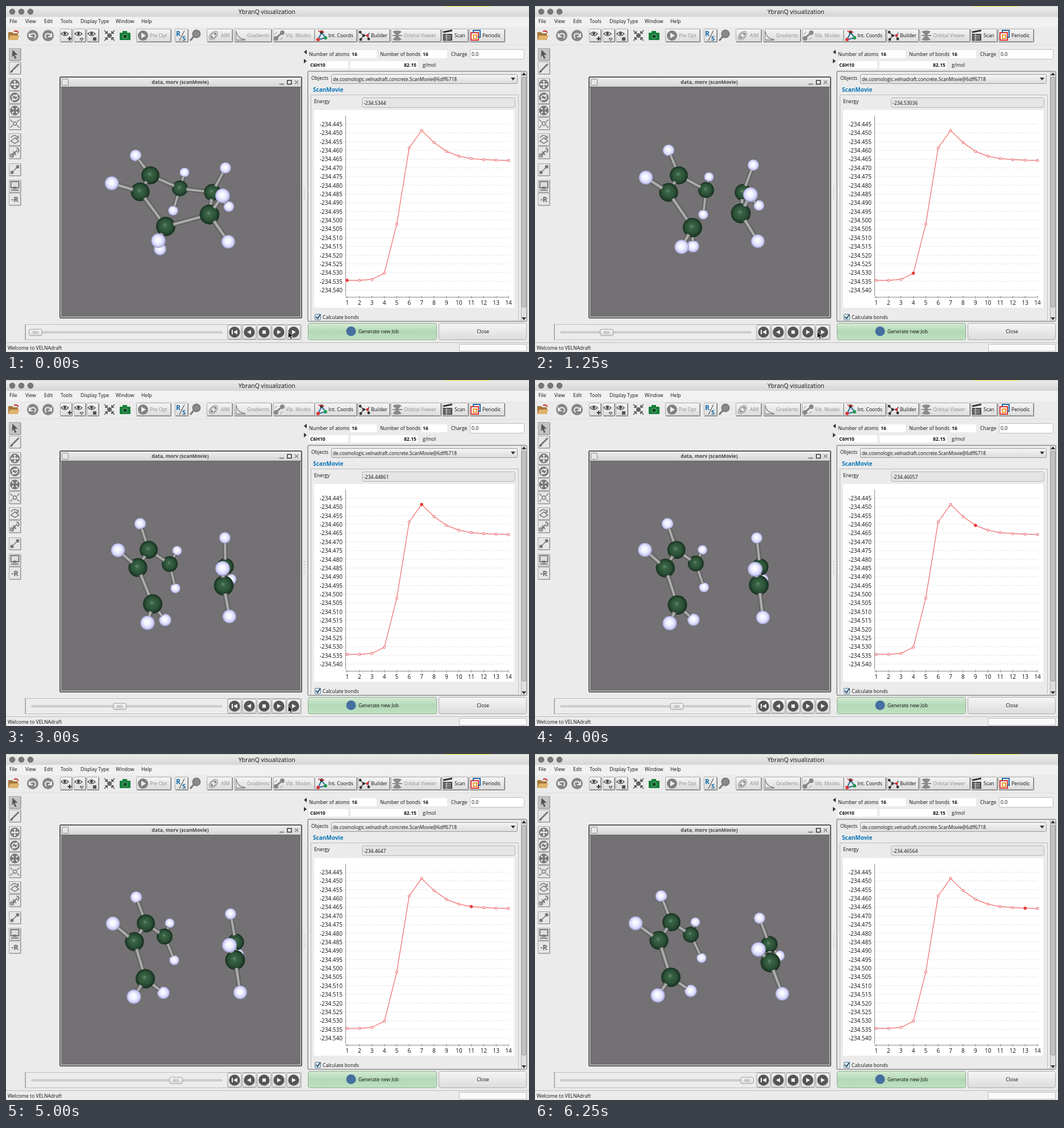
An HTML page for the animation above (6500 ms loop, 920 by 609 pixels).

```html
<!DOCTYPE html>
<html>
<head>
<meta charset="utf-8">
<title>Scan viewer</title>
<style>
html, body { margin: 0; width: 100%; height: 100%; overflow: hidden; background: #ebebeb; }
svg { display: block; }
text { font: 8.6px "Open Sans", "Noto Sans", sans-serif; fill: #111; white-space: pre; }
.b { font-weight: 700; }
.off { fill: #8d8d8d; }
.axis { font-size: 10px; font-weight: 500; }
</style>
</head>
<body>
<svg id="stage" width="920" height="609" viewBox="0 0 920 609"></svg>
<script>
const rect = (x, y, w, h, fill, stroke = 'none', rx = 0, sw = 1) =>
  `<rect x="${x}" y="${y}" width="${w}" height="${h}" fill="${fill}" stroke="${stroke}" rx="${rx}" stroke-width="${sw}"/>`;
const disc = (x, y, r, fill, stroke = 'none', sw = 1) =>
  `<circle cx="${x}" cy="${y}" r="${r}" fill="${fill}" stroke="${stroke}" stroke-width="${sw}"/>`;
const path = (d, stroke, sw = 1, fill = 'none', more = '') =>
  `<path d="${d}" stroke="${stroke}" stroke-width="${sw}" fill="${fill}" ${more}/>`;
const shape = (d, fill) => path(d, 'none', 0, fill);
const text = (x, y, s, more = '') => `<text x="${x}" y="${y}" ${more}>${s}</text>`;
const at = (x, y, s) => `<g transform="translate(${x} ${y})">${s}</g>`;
const mid = 'text-anchor="middle"', end = 'text-anchor="end"';
const ramp = (id, ...cols) => `<linearGradient id="${id}" x2="0" y2="1">` +
  cols.map((c, i) => `<stop offset="${i / (cols.length - 1)}" stop-color="${c}"/>`).join('') + '</linearGradient>';
const ball = (id, ...stops) => `<radialGradient id="${id}" cx=".5" cy=".5" r=".52" fx=".45" fy=".42">` +
  stops.map(([o, c]) => `<stop offset="${o}" stop-color="${c}"/>`).join('') + '</radialGradient>';

// ---- scan data ----
const energies = [-234.5344, -234.53441, -234.53388, -234.53036, -234.50223, -234.45856, -234.44861,
  -234.45552, -234.46057, -234.46332, -234.4647, -234.46532, -234.46564, -234.4658];
const plotX = i => 600 + i * 21.85;
const plotY = e => 208 + (-234.445 - e) * 3073.7;

// ---- molecule: atoms from back to front, x and y sampled along the scan ----
const xKeys = [1, 4, 7, 11, 14], yKeys = [1, 4, 9, 14];
const atoms = [
  [[314, 306, 301, 288, 282], [293, 301, 299, 296]],
  [[294, 296, 298, 296, 293], [360, 367, 365, 359]],
  [[306, 301, 288, 279, 274], [321, 324, 323, 318]],
  [[392, 394, 396, 409, 430], [353, 351, 351, 355]],
  [[363, 366, 386, 404, 412], [328, 328, 329, 335]],
  [[386, 384, 385, 395, 395], [285, 280, 278, 289]],
  [[228, 235, 236, 229, 222], [263, 254, 253, 250]],
  [[254, 253, 251, 246, 240], [298, 298, 299, 296]],
  [[271, 278, 280, 277, 274], [428, 423, 422, 417]],
  [[236, 235, 232, 226, 218], [327, 328, 331, 328]],
  [[281, 277, 258, 245, 239], [388, 390, 396, 393]],
  [[358, 362, 383, 403, 414], [367, 365, 361, 367]],
  [[391, 392, 393, 412, 435], [415, 414, 418, 422]],
  [[186, 195, 197, 188, 177], [312, 302, 299, 298]],
  [[268, 258, 249, 225, 216], [413, 424, 428, 425]],
  [[381, 379, 381, 393, 393], [334, 332, 333, 344]]
];
const carbons = [2, 4, 7, 9, 10, 11];
const bonds = [[0, 2], [1, 2], [3, 4], [4, 5], [6, 7], [2, 7], [7, 9], [9, 10], [8, 10], [4, 11],
  [11, 12], [9, 13], [10, 14], [11, 15]];
const weakBonds = [[2, 4], [10, 11]];

// Cubic Hermite through the keys
function curve(keys, v, p) {
  const last = keys.length - 1;
  let i = 0;
  while (i < last - 1 && p > keys[i + 1]) i++;
  const slope = j => {
    const a = Math.max(0, j - 1), b = Math.min(last, j + 1);
    return (v[b] - v[a]) / (keys[b] - keys[a]);
  };
  const h = keys[i + 1] - keys[i], u = (p - keys[i]) / h, w = 1 - u;
  return v[i] * (1 + 2 * u) * w * w + v[i + 1] * u * u * (3 - 2 * u) + h * u * w * (slope(i) * w - slope(i + 1) * u);
}

function bondShape(a, b, width) {
  const dx = b.x - a.x, dy = b.y - a.y, f = Math.min(.8, a.r * .82 / Math.hypot(dx, dy));
  const d = `M${a.x + dx * f} ${a.y + dy * f}L${b.x} ${b.y}`;
  return path(d, '#555', width) + path(d, '#858585', width * .72) + path(d, '#b2b2b2', width * .34);
}

function molecule(p) {
  const links = p < 4 ? bonds.concat(weakBonds) : bonds;
  const pts = atoms.map(([xs, ys], i) => {
    const c = carbons.includes(i);
    return { c, x: curve(xKeys, xs, p), y: curve(yKeys, ys, p), r: c ? 13.2 + .38 * i : 8.5 + .3 * i };
  });
  return pts.map((a, i) => links.filter(l => l[1] === i)
    .map(l => bondShape(pts[l[0]], a, 6.8 + i * .13)).join('') +
    disc(a.x, a.y, a.r, a.c ? 'url(#carbon)' : 'url(#hydrogen)')).join('');
}

// ---- window chrome and toolbar ----
const button = (x, w) => rect(x + .5, 40.5, w, 22, 'url(#btn)', '#aaa', 1) +
  path(`M${x + 1} 63.5H${x + w + 1.5}V41`, '#777');
const eye = x => path(`M${x} 49q6 -7 13 0q-6 6 -13 0z`, '#444', 1.2, '#eee') + disc(x + 6.5, 48.5, 2.4, '#444');
const undo = path('M-5 1Q-3 -5 3 -3Q7 0 3 5M-6 -4V2H0', '#eee', 2);

function toolbar() {
  let s = rect(0, 0, 920, 19, 'url(#bar)') + rect(0, 0, 920, 1, '#c3d2bf') + rect(771, 0, 81, 1, '#e5e02c') +
    [11, 27, 43].map(x => disc(x, 10, 4.8, '#777', '#666')).join('') +
    text(459, 14, 'YbranQ visualization', mid + ' style="font-size:10.5px"') +
    rect(0, 19, 920, 18, '#f1f1f1') + path('M0 68.5H920', '#dedede');
  [[6, 'File'], [34, 'View'], [67, 'Edit'], [96, 'Tools'], [131, 'Display Type'], [193, 'Window'], [238, 'Help']]
    .forEach(([x, t]) => s += text(x, 30, t));
  s += shape('M4 46h7l2 2h8v12H4z', '#a8773c') + shape('M7 52h17l-4 8H4z', '#dfb26b') + path('M14 45q5 -3 8 2', '#c33', 2);
  s += at(47, 52, disc(0, 0, 10, '#858585') + undo) + at(74, 52, disc(0, 0, 10, '#858585') + `<g transform="scale(-1 1)">${undo}</g>`);
  [95, 119, 142].forEach(x => s += button(x, 20) + eye(x + 2));
  s += path('M112 54v7M108.500 57.500h7', '#333', 2) + path('M130 57h6l-3 4z', '#333', 1) + rect(153, 55, 6, 6, '#555');
  s += disc(182, 52, 4, '#666') + path('M173 43l5 5M191 43l-5 5M173 61l5 -5M191 61l-5 -5M178 44v4h-4M186 44v4h4M178 60v-4h-4M186 60v-4h4', '#444', 1.4);
  s += rect(200, 47, 19, 13, '#15803a', 'none', 1) + rect(205, 44, 8, 4, '#15803a') + disc(209.5, 53.5, 4, '#0b4d22', '#8cc79d');
  s += button(229, 60) + disc(241, 52, 9, '#808080') + shape('M238 47l8 5l-8 5z', '#eee') + text(253, 55, 'Pre Opt', 'class="off"');
  s += button(297, 22) + text(299, 53, 'R', 'class="b" style="font-size:12px;fill:#1769a5"') +
    text(310, 61, 'S', 'class="b" style="font-size:11px;fill:#1769a5"') + path('M305 61L314 43', '#333');
  s += disc(335, 49, 6.5, '#8a8a8a', '#777', 2) + path('M330 54l-6 7', '#777', 3);
  [[353, 44, 378, 'AIM', 1], [401, 65, 424, 'Gradients', 1], [470, 72, 492, 'Vib. Modes', 1], [543, 73, 567, 'Int. Coords'],
    [619, 55, 642, 'Builder'], [677, 87, 700, 'Orbital Viewer', 1], [767, 45, 789, 'Scan'], [815, 61, 838, 'Periodic']]
    .forEach(([x, w, tx, t, off]) => s += button(x, w) + text(tx, 55, t, off ? 'class="off"' : ''));
  s += `<g transform="rotate(-45 365 52)">${[9, 6].map(r => `<ellipse cx="365" cy="52" rx="${r}" ry="${r * .6}" fill="none" stroke="#888"/>`).join('')}</g>` +
    disc(362, 55, 2, '#888') + disc(368, 49, 2, '#888');
  s += path('M404.5 43V60H421M405 45Q408 58 421 59', '#888', 1.3);
  s += path('M473 58L487 46', '#888', 3) + disc(475, 57, 4, '#888') + disc(486, 47, 4, '#888') + path('M473 50l4 -5M482 60l5 -5', '#888');
  s += path('M549 59L555 47L563 56Z', '#2b6f9e', 2) + disc(549, 59, 3, '#d33') + disc(555, 46, 3, '#333') + disc(562, 56, 3, '#1f9b4b') + path('M549 44l11 2', '#d33', 1.5);
  s += path('M623 46l6 6l-5 7M629 52h8l2 -5M636 52l2 6', '#555', 1.5) +
    [[623, 46, '#333'], [629, 52, '#333'], [624, 59, '#333'], [636, 52, '#d33'], [638, 58, '#333']].map(a => disc(a[0], a[1], 2.4, a[2])).join('');
  s += shape('M680 45q8 -4 16 0l-7 7l7 7q-8 4 -16 0l7 -7z', '#8a8a8a') + path('M680 52h17', '#8a8a8a', 2);
  s += rect(769, 49, 16, 12, '#444') + path('M769 46l16 -3', '#333', 3) + path('M771 52h12M771 55h12M771 58h12', '#ddd') + path('M775 49v12', '#ddd');
  s += rect(818, 47, 13, 13, '#fff', '#d33', 0, 2) + path('M822 47v-4h12v12h-4', '#2467a8', 2) + rect(822, 51, 6, 6, '#fff', '#e89b2c', 0, 2);
  return s;
}

function sideTools() {
  const g = '#777';
  const ring = disc(0, 0, 8.5, g);
  const cross = path('M-6 0H6M0 -6V6', '#eee', 1.8) + shape('M-7 0l3 -3v6zM7 0l-3 -3v6zM0 -7l-3 3h6zM0 7l-3 -3h6z', '#eee');
  const inward = path('M-5 -5l3 3M5 -5l-3 3M-5 5l3 -3M5 5l-3 -3', '#eee', 2);
  const icons = [
    shape('M-4 -8l9 9h-5l3 6l-3 1l-2 -6l-3 3z', '#555'),
    path('M-7 7L7 -7', g, 3) + path('M-8 8l4 -2', '#444', 1.5),
    ring + cross,
    ring + path('M-5 1a5 5 0 0 1 8 -4M5 -1a5 5 0 0 1 -8 4M4 -6v4h-4M-4 6v-4h4', '#eee', 1.7),
    ring + inward,
    disc(0, 0, 3, 'none', g, 1.5) + path('M-8 -7l4 4M8 -7l-4 4M-8 7l4 -4M8 7l-4 -4', g, 1.5),
    path('M-7 3l7 -6l7 6l-7 4zM-7 -3q6 -8 13 0M6 -7v5h-5', g, 1.5),
    path('M-6 6l5 -5l5 -5M-3 -2l5 6M3 -8q7 2 2 8', g, 2) + disc(-5, 5, 3, 'none', g, 1.5),
    path('M-6 6L6 -6', g, 1.5) + disc(-5, 5, 3, g) + disc(5, -5, 3, g),
    rect(-7, -8, 14, 11, '#ddd', g, 0, 2) + rect(-3, 1, 6, 4, g) + path('M-7 7H7', g, 2),
    text(0, 5, '-R', mid + ' class="b" style="font-size:13px;fill:#666"')
  ];
  return [74, 98, 127, 150, 173, 196, 224, 247, 277, 306, 329].map((y, i) =>
    rect(5.5, y + .5, 20, 21, i ? '#e6e6e6' : '#c4c4c4', '#aaa') + path(`M6 ${y + 22}H26V${y + 1}`, '#888') +
    at(15.5, y + 11, icons[i])).join('');
}

function viewer() {
  return rect(95, 125, 425, 424, '#e4e4e4', '#5a5a5a', 2, 2) + rect(96, 126, 423, 16, 'url(#bar)') +
    rect(97, 142, 421, 405, '#737173') + path('M96 142.500H519', '#666') +
    rect(98.5, 128.5, 11, 11, '#e5e5e5', '#888', 1) + text(306.5, 137, 'data, morv (scanMovie)', mid + ' class="b" style="fill:#444"') +
    path('M481 137.500h8', '#666', 1.5) + rect(495, 131, 7, 6.5, '#eee', '#333', 0, 1.5) + path('M508 131l6 6M514 131l-6 6', '#777', 1.2);
}

function player() {
  const glyphs = ['M-5 -4h2v8h-2zM5 -4v8l-7 -4z', 'M3 -4v8l-7 -4z', 'M-3 -3h6v6h-6z', 'M-3 -4l7 4l-7 4z', 'M-3 -4l7 4l-7 4z'];
  return rect(34.5, 560.5, 485, 27, '#ececec', '#bdbdbd') + path('M34 560V588', '#888') +
    rect(45, 573, 335, 2.5, '#ddd', '#aaa', 1, .8) +
    glyphs.map((d, i) => at(402 + i * 26, 574, rect(-12, -12.5, 24, 25, 'url(#btn)', '#999', 2) + disc(0, 0, 9.7, '#555') + shape(d, '#f2f2f2'))).join('');
}

function inspector() {
  let s = shape('M529 77v8l-5 -4z', '#333') + shape('M524 93v8l5 -4z', '#333');
  s += [[606, 78, 46, 14], [731, 78, 45, 14], [533, 97, 69, 13], [606, 97, 118, 13]].map(a => rect(...a, '#fff')).join('') +
    rect(816.5, 76.5, 95, 17, '#fff', '#bbb', 2) +
    text(533, 88, 'Number of atoms') + text(608, 88, '16', 'class="b"') + text(658, 88, 'Number of bonds') +
    text(733, 88, '16', 'class="b"') + text(783, 88, 'Charge') + text(819, 88, '0.0') +
    text(535, 107, 'C6H10', 'class="b"') + text(722, 107, '82.15', 'class="b" ' + end) + text(733, 107, 'g/mol');
  for (let y = 320; y < 344; y += 5) s += disc(525, y, .8, '#aaa');
  s += rect(531, 115, 385, 440, '#ebebeb', '#8e8e8e', 2, 1.5) +
    text(537, 130, 'Objects') + rect(572.5, 120.5, 327, 16, 'url(#btn)', '#999', 2) + shape('M888 126h8l-4 5z', '#333') +
    text(575, 132, 'de.cosmologic.velnadraft.concrete.ScanMovie@6dff6718', 'style="font-size:8.3px"') +
    text(540, 151, 'ScanMovie', 'class="b" style="font-size:10px;fill:#0b76b7"') +
    path('M536.500 555V156.500H901.500V555', '#bcbcbc') +
    text(542, 171, 'Energy') + rect(626.5, 161.5, 269, 17, '#e5e5e5', '#b5b5b5', 3);
  s += rect(542, 183, 352, 348, '#fff');
  for (let i = 0; i < 20; i++) {
    const e = -234.445 - i * .005, y = plotY(e);
    s += path(`M598 ${y}H884`, '#dcdcdc', 1, 'none', 'stroke-dasharray="2 2"') + text(592, y + 4, e.toFixed(3), `class="axis" ${end}`);
  }
  s += path('M597.500 193V510M597 512.500H884', '#8a8a8a');
  energies.forEach((e, i) => s += path(`M${plotX(i)} 510v5`, '#999') + text(plotX(i), 526, i + 1, `class="axis" ${mid}`));
  s += path('M' + energies.map((e, i) => plotX(i) + ' ' + plotY(e)).join('L'), '#f06a6a', 1.2) +
    energies.map((e, i) => disc(plotX(i), plotY(e), 2, '#fff', '#e85050')).join('');
  s += rect(543.5, 542.5, 10, 10, '#cfe3ef', '#5b7f96', 1) + path('M545 547l3 3l5 -7', '#234', 1.5) + text(557, 551, 'Calculate bonds');
  s += rect(906.5, 115.5, 9, 439, '#e0e0e0', '#aaa') + rect(907, 125, 8, 405, '#c2c2c2', '#999', 3) +
    shape('M907 122h8l-4 -5z', '#333') + shape('M907 548h8l-4 5z', '#333');
  s += rect(531.5, 558.5, 226, 29, 'url(#green)', '#8fae93', 3) + disc(607, 572.5, 8.5, '#456f9f') + text(620, 576, 'Generate new Job') +
    rect(761.5, 558.5, 154, 29, 'url(#btn)', '#aaa', 3) + text(839, 576, 'Close', mid);
  return s;
}

const stage = document.getElementById('stage');
stage.innerHTML = '<defs>' + ramp('bar', '#ededed', '#d5d5d5') + ramp('btn', '#f5f5f5', '#dcdcdc') + ramp('green', '#d4ead3', '#b2d9b6', '#bfe1c1') +
  ball('carbon', [0, '#668c6e'], [.22, '#3a6445'], [.65, '#2b5036'], [.9, '#1b3624'], [1, '#10221a']) +
  ball('hydrogen', [0, '#fff'], [.4, '#f2f2ff'], [.75, '#d2d2fa'], [.92, '#a5a5d2'], [1, '#7c7ca4']) + '</defs>' +
  rect(0, 0, 920, 609, '#ebebeb') + toolbar() + sideTools() + viewer() + player() + inspector() +
  path('M0 592.500H920', '#bbb') + text(3, 605, 'Welcome to VELNAdraft') + rect(797.5, 595.5, 118, 12, '#fafafa', '#bbb') +
  '<g id="mol"></g>' +
  `<g id="thumb">${rect(-11.5, 569, 23, 11, 'url(#btn)', '#999', 3)}${path('M-4 572v5M-1.500 572v5M1 572v5M3.500 572v5', '#999')}</g>` +
  disc(0, 0, 2.4, '#e83c3c', '#e83c3c').replace('<circle', '<circle id="dot"') +
  text(629, 174, '', 'id="energy"') +
  `<g id="pointer">${path('M496.500 573.500v11l2.500 -2.300l2 4.300l2 -1l-2 -4h3.500z', '#fff', .7, '#000')}</g>`;

const [mol, thumb, dot, energy, pointer] = ['mol', 'thumb', 'dot', 'energy', 'pointer'].map(id => document.getElementById(id));
let drawn = -1;

function draw(now) {
  const step = Math.floor(now % 6500 / 250);
  if (step !== drawn) {
    drawn = step;
    const point = 1 + Math.ceil(step / 2);
    const shown = Math.min(point, 13) - 1; // the readout lags on the last point
    mol.innerHTML = molecule(point);
    thumb.setAttribute('transform', `translate(${52 + (point - 1) * 24.7} 0)`);
    dot.setAttribute('cx', plotX(shown));
    dot.setAttribute('cy', plotY(energies[shown]));
    energy.textContent = energies[shown];
    pointer.style.display = step < 16 ? '' : 'none';
  }
}

const start = performance.now();
function tick() {
  draw(performance.now() - start);
  requestAnimationFrame(tick);
}
tick();
</script>
</body>
</html>
```
